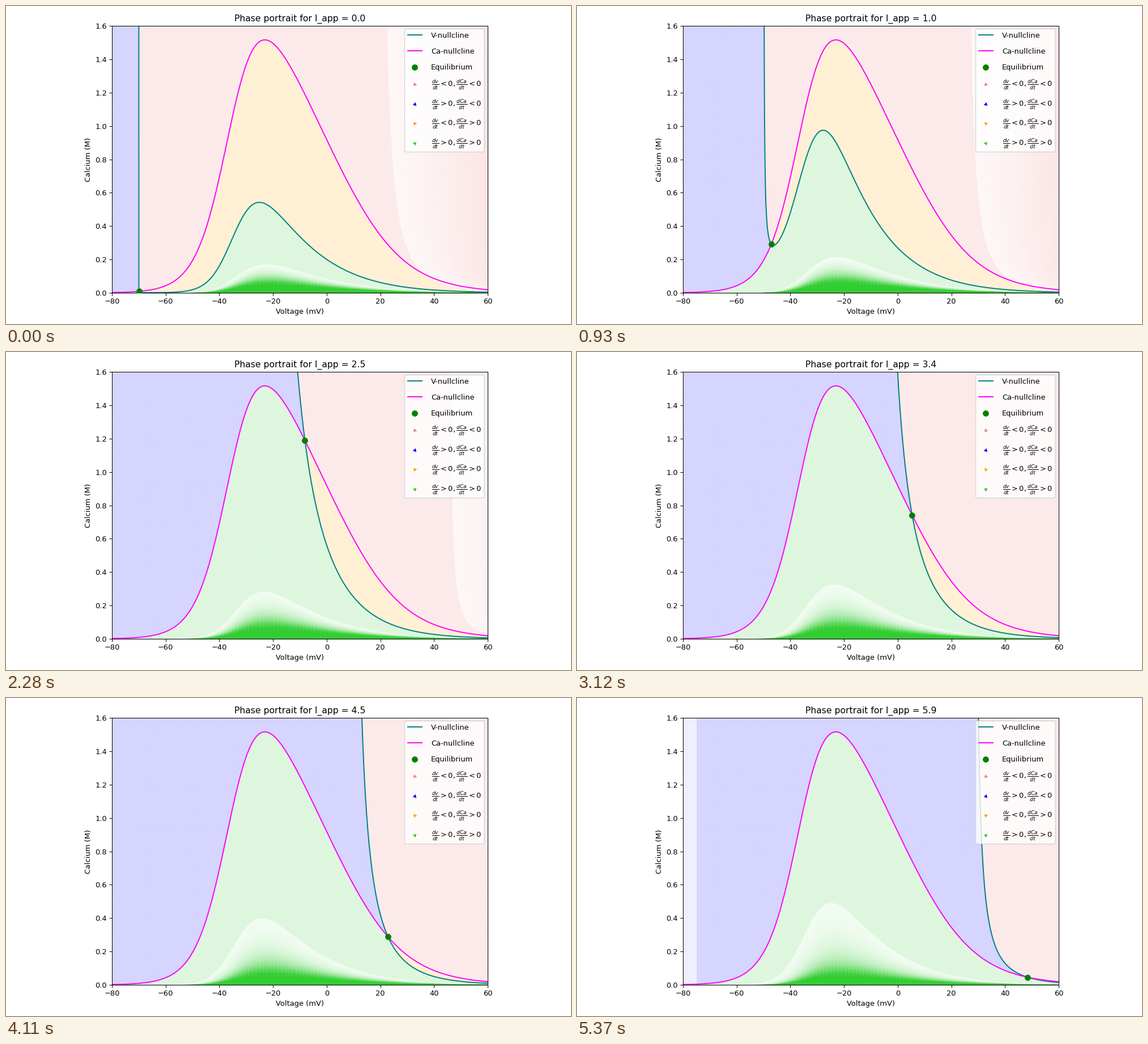
A matplotlib script that plays this animation: 997x561 px, repeating every 5460 ms.

```python
import numpy as np
import matplotlib.pyplot as plt
from matplotlib.animation import FuncAnimation
from matplotlib.colors import to_rgb
from matplotlib.patches import FancyBboxPatch

W, H, DPI = 997, 561, 93.5
LEFT, TOP, AW, AH = 187, 35, 663, 471
V_MIN, V_MAX, CA_MAX = -80, 60, 1.6
TICK_MS = 30
N_STATES = 60

plt.rcParams["font.family"] = "DejaVu Sans"
COLORS = ["lightcoral", "blue", "orange", "limegreen"]
PALETTE = np.array([to_rgb(c) for c in COLORS]) * 255


# Calcium current: J(V, Ca) = a(V) / Ca - b(V), from the GHK equation
def ghk(v):
    x = v / 12.84 + 1e-9
    m = 1 / (1 + np.exp(-(v + 35.15) / 6))
    b = 0.392 * m**2 * x / -np.expm1(-x)
    return 2 * b * np.exp(-x), b


def leak(v):
    return 0.05 * (v + 70)


def ca_nullcline(v):
    a, b = ghk(v)
    return -b + np.sqrt(b**2 + 2 * a)


v_grid = np.linspace(V_MIN, V_MAX, 1400)
ca_null = ca_nullcline(v_grid)
rest_curve = leak(v_grid) + ghk(v_grid)[1]
balance = leak(v_grid) - 0.5 * ca_null


def v_nullcline(i_app):
    v0 = np.interp(i_app, rest_curve, v_grid)
    v = v0 + np.geomspace(1e-6, V_MAX + 0.5 - v0, 900)
    a, b = ghk(v)
    ca = a / np.maximum(leak(v) + b - i_app, 1e-7)
    return v, np.minimum(ca, 10)


def equilibrium(i_app):
    v = np.interp(i_app, balance, v_grid)
    return v, np.interp(v, v_grid, ca_null)


# Direction field, shaded per pixel as a lattice of small arrows
cols = np.arange(AW) + 0.5
rows = np.arange(AH) + 0.5
v_px = V_MIN + (V_MAX - V_MIN) * cols / AW
ca_px = (CA_MAX * (1 - rows / AH))[:, None]
a_px, b_px = ghk(v_px)
drift = a_px / ca_px - b_px - leak(v_px)
ca_rising = 2 * (ca_px < ca_nullcline(v_px))
lattice = ((1 + 0.5 * np.cos(2 * np.pi * cols / (AW / 280)))
           * (1 + 0.3 * np.cos(2 * np.pi * rows / (AH / 200)))[:, None])


def field(i_app):
    dv = i_app + drift
    unit = np.interp(i_app, [0, 1, 1.8, 2.5, 3.4, 4.5, 5.9],
                     [5.28, 4.68, 4.68, 4.72, 4.97, 5.36, 6.15])
    length = np.abs(dv) / unit
    # very short arrows become dots, longer ones start small and then overlap
    ink = np.where(length < 1, 0.18, 0.06 * np.minimum(length, 9)**3)
    cover = 1 - np.exp(-ink * lattice)
    color = PALETTE[(dv > 0) + ca_rising]
    return (255 + cover[..., None] * (color - 255)).astype(np.uint8)


fig = plt.figure(figsize=(997.001 / DPI, H / DPI), dpi=DPI, facecolor="white")
image = fig.figimage(field(0), xo=LEFT, yo=H - TOP - AH, origin="upper",
                     zorder=-1)
ax = fig.add_axes([LEFT / W, 1 - (TOP + AH) / H, AW / W, AH / H],
                  facecolor="none")
v_line, = ax.plot([], [], color="teal", lw=1.5)
ax.plot(v_grid, ca_null, color="magenta", lw=1.5)
dot, = ax.plot([], [], "o", color="green", ms=7.3, zorder=3)
ax.set(xlim=(V_MIN, V_MAX), ylim=(0, CA_MAX),
       xlabel="Voltage (mV)", ylabel="Calcium (M)")
ax.set_xticks(range(V_MIN, V_MAX + 1, 20))
ax.set_yticks(np.arange(9) * 0.2)
title = ax.set_title("")


def draw_legend():
    key = fig.add_axes([0, 0, 1, 1], zorder=5)
    key.set(xlim=(0, W), ylim=(H, 0))
    key.axis("off")
    key.add_patch(FancyBboxPatch(
        (703.5, 40.5), 140.5, 217, boxstyle="round,pad=0,rounding_size=2.6",
        fc="white", ec="0.8", lw=1, alpha=0.8))
    for y, color, label in [(51, "teal", "V-nullcline"),
                            (79, "magenta", "Ca-nullcline")]:
        key.plot([708.5, 734], [y, y], color=color, lw=1.5)
        key.text(750, y + 4.5, label, size=10)
    key.plot(721, 108.3, "o", color="green", ms=7.3)
    key.text(750, 111.5, "Equilibrium", size=10)
    signs = [("<", "<", 135), (">", "<", 225), ("<", ">", 45), (">", ">", -45)]
    for k, (dv, dca, angle) in enumerate(signs):
        y = 138 + 34.7 * k
        key.plot(721, y, marker=(3, 0, angle), color=COLORS[k], ms=6, mew=0)
        key.text(750.7, y + 0.8, rf"$\frac{{dv}}{{dt}} {dv} 0, "
                 rf"\frac{{dCa}}{{dt}} {dca} 0$", size=10, va="center")


draw_legend()

# Each state lasts three ticks; two of them are held one tick longer
holds = np.full(N_STATES, 3)
holds[[0, 31]] = 4
schedule = np.repeat(np.arange(N_STATES), holds)
shown = {"state": None}


def update(frame):
    state = schedule[frame]
    if state != shown["state"]:
        shown["state"] = state
        i_app = state / 10
        image.set_data(field(i_app))
        v_line.set_data(*v_nullcline(i_app))
        v, ca = equilibrium(i_app)
        dot.set_data([v], [ca])
        title.set_text(f"Phase portrait for I_app = {i_app:.1f}")
    return image, v_line, dot, title


anim = FuncAnimation(fig, update, frames=len(schedule), interval=TICK_MS,
                     repeat=True, repeat_delay=0, blit=False)
plt.show()
```
